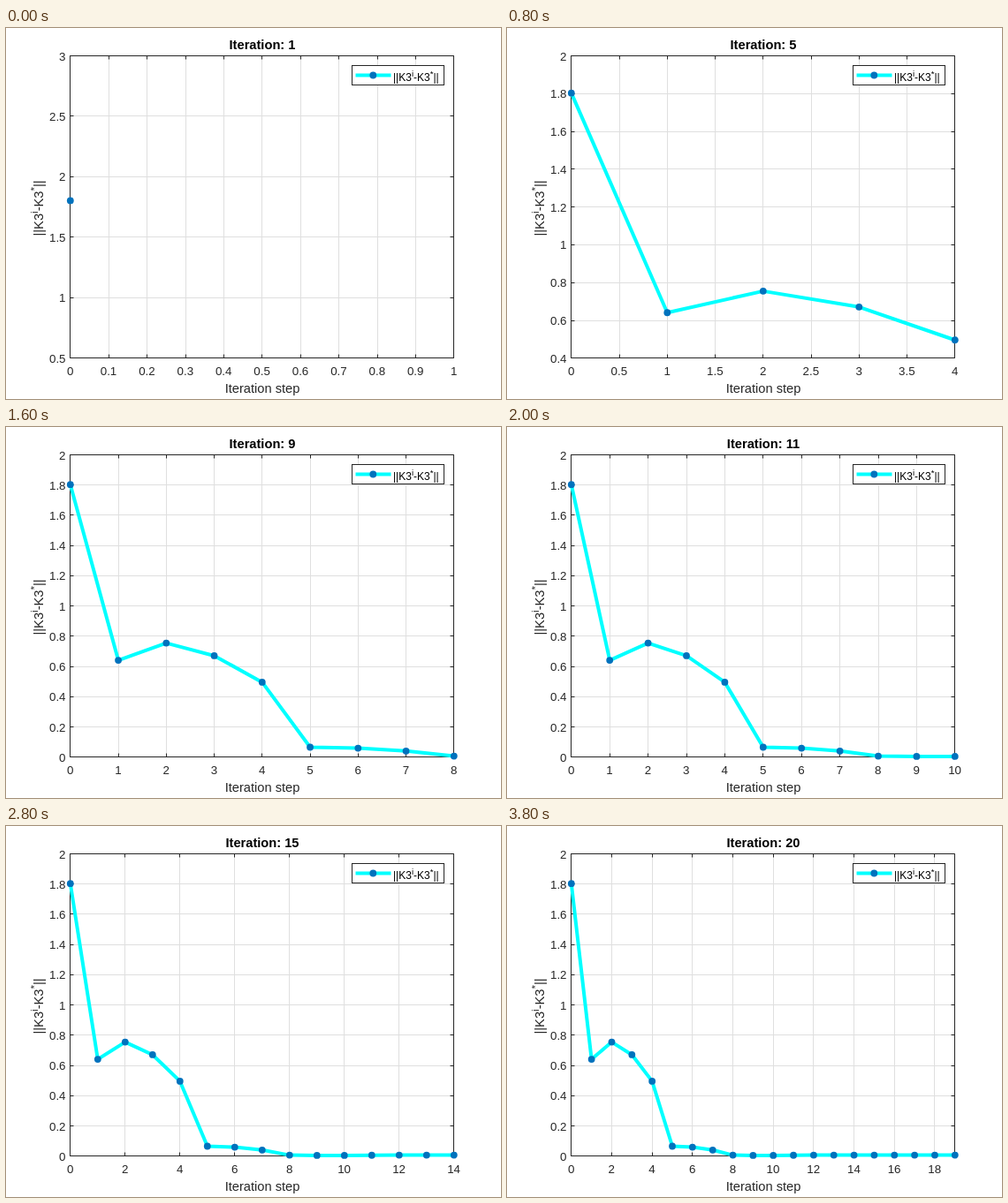
Recreate the animation shown at these times as an HTML page. Size 560 px wide and 420 px high, loop 4000 ms.

```html
<!DOCTYPE html>
<html lang="en">
<head>
<meta charset="utf-8">
<title>Iteration plot</title>
<style>
  html, body { margin: 0; width: 100%; height: 100%; overflow: hidden; background: #fff; }
  svg { display: block; width: 560px; height: 420px; }
  text { font-family: "Liberation Sans", Arial, sans-serif; fill: #262626; white-space: pre; }
  .tick { font-size: 13.33px; }
  .label { font-size: 14.67px; }
  .title { font-size: 14.67px; font-weight: bold; fill: #000; }
  .legend { font-size: 12px; fill: #000; }
  .mid { text-anchor: middle; }
  .end { text-anchor: end; }
  .grid { stroke: #dfdfdf; fill: none; }
  .axis { stroke: #262626; fill: none; }
  .curve { stroke: #0ff; stroke-width: 4; stroke-linejoin: round; fill: none; }
  circle { fill: #0072bd; }
</style>
</head>
<body>
<svg id="plot" viewBox="0 0 560 420"></svg>
<script>
const STEP_MS = 200, STEPS = 20;
const LEFT = 72.8, RIGHT = 506.8, TOP = 31.5, BOTTOM = 373.8, TICK = 4;
const errors = [1.803, 0.641, 0.755, 0.671, 0.496, 0.066, 0.06, 0.041, 0.007, 0.005, 0.005, 0.006];
const valueAt = i => errors[i] ?? 0.007;

const svg = document.getElementById('plot');
const crisp = v => Math.floor(v) + 0.5;
const path = (cls, d) => `<path class="${cls}" d="${d}"/>`;
const text = (cls, x, y, s) => `<text class="${cls}" x="${x}" y="${y}">${s}</text>`;
const dot = (x, y) => `<circle cx="${x}" cy="${y}" r="3.9"/>`;

function norm(size) {
  const up = size * 0.4, small = size * 0.8;
  const sup = s => `<tspan dy="${-up}" font-size="${small}">${s}</tspan>`;
  return `||K3${sup('i')}<tspan dy="${up}">-K3</tspan>${sup('*')}<tspan dy="${up}">||</tspan>`;
}

function xStep(max) {
  if (max === 15) return 5;
  if (max > 11) return 2;
  if (max > 5) return 1;
  if (max > 2) return 0.5;
  return max / 10;
}

function yRange(n) {
  if (n === 1) return [0.5, 3, 0.5];
  return [n < 5 ? 0.6 : n < 6 ? 0.4 : 0, 2, 0.2];
}

function ticks(min, max, step) {
  const count = Math.floor((max - min) / step + 1e-6);
  return Array.from({ length: count + 1 }, (_, i) => +(min + i * step).toFixed(1));
}

function draw(n) {
  const xMax = Math.max(1, n - 1);
  const [yMin, yMax, yStep] = yRange(n);
  const px = v => LEFT + v / xMax * (RIGHT - LEFT);
  const py = v => BOTTOM - (v - yMin) / (yMax - yMin) * (BOTTOM - TOP);
  const l = crisp(LEFT), r = crisp(RIGHT), t = crisp(TOP), b = crisp(BOTTOM);
  let grid = '', axis = `M${l} ${t}H${r}V${b}H${l}Z`, labels = '';

  for (const v of ticks(0, xMax, xStep(xMax))) {
    const x = crisp(px(v));
    grid += `M${x} ${t}V${b}`;
    axis += `M${x} ${b}v${-TICK}M${x} ${t}v${TICK}`;
    labels += text('tick mid', px(v) - 0.2, 393, v);
  }
  for (const v of ticks(yMin, yMax, yStep)) {
    const y = crisp(py(v));
    grid += `M${l} ${y}H${r}`;
    axis += `M${l} ${y}h${TICK}M${r} ${y}h${-TICK}`;
    labels += text('tick end', 67.5, py(v) + 5, v);
  }

  const points = Array.from({ length: n }, (_, i) => [px(i), py(valueAt(i))]);
  svg.innerHTML =
    path('grid', grid) + path('axis', axis) + labels +
    text('title mid', 290, 24, `Iteration: ${n}`) +
    text('label mid', 290, 413, 'Iteration step') +
    `<g transform="translate(41.5 235.5) rotate(-90)">${text('label', 0, 0, norm(14.67))}</g>` +
    path('curve', 'M' + points.join('L')) +
    points.map(p => dot(...p)).join('') +
    '<rect class="axis" x="391.5" y="42.5" width="104" height="22" style="fill:#fff"/>' +
    path('curve', 'M395.5 53.5H435.5') + dot(415.3, 53.5) +
    text('legend', 438, 60, norm(12));
}

let shown = 0;
const start = performance.now();
function frame() {
  const n = Math.floor((performance.now() - start) / STEP_MS) % STEPS + 1;
  if (n !== shown) draw(shown = n);
  requestAnimationFrame(frame);
}
frame();
</script>
</body>
</html>
```
